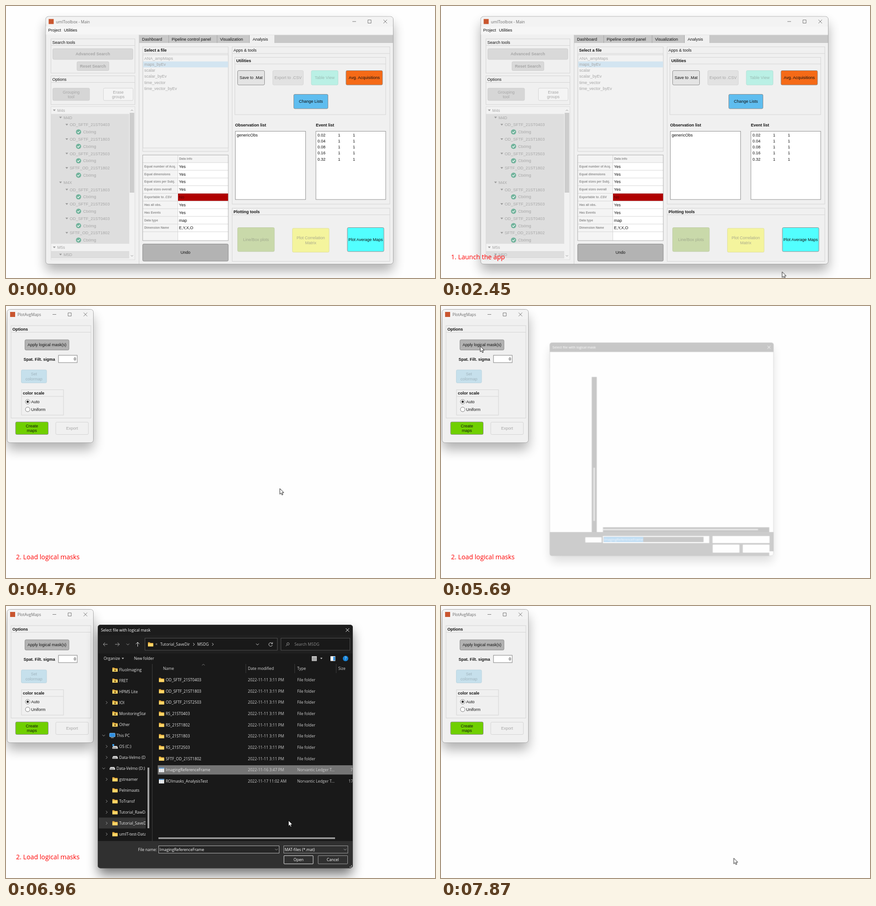
Animation of 940 by 596 pixels, one loop 8000 ms. Source, as an HTML page:

```html
<!DOCTYPE html>
<html lang="en">
<head>
<meta charset="utf-8">
<title>Average maps walkthrough</title>
<style>
html, body { margin: 0; width: 100%; height: 100%; overflow: hidden; background: #fefefe; }
svg { display: block; width: 940px; height: 596px; }
text { font: 9px "Liberation Sans", Arial, sans-serif; }
.b { font-weight: bold; }
.s { font-size: 6.7px; font-weight: bold; }
.ui { font: 8.6px "Open Sans", "Noto Sans", sans-serif; }
.cap { font: 14.2px "Open Sans", "Noto Sans", sans-serif; fill: #f00; }
.mid { text-anchor: middle; }
.end { text-anchor: end; }
.soft { filter: blur(13px); }

.t { animation: 8s step-end infinite; }
#main { animation-name: main; }
#ready { animation-name: ready; }
#busy { animation-name: busy; }
#cap1 { animation-name: cap1; }
#cap2 { animation-name: cap2; }
#tool { animation-name: tool; }
#dialog { animation-name: dialog; transform-origin: 480.5px 307.8px; }
#blank { animation-name: blank; }
#hover { animation-name: hover; }
#picked { animation-name: picked; }
#marked { animation-name: marked; }
#cursor { animation: seen 8s step-end infinite, move 8s infinite; }

@keyframes main { 0% { opacity: 1 } 59.5% { opacity: 0 } }
@keyframes ready { 0% { opacity: 1 } 44.6% { opacity: 0 } }
@keyframes busy { 0% { opacity: 0 } 44.6% { opacity: 1 } }
@keyframes cap1 { 0% { opacity: 0 } .875% { opacity: 1 } 44.6% { opacity: 0 } }
@keyframes cap2 { 0% { opacity: 0 } 59.5% { opacity: 1 } 91.375% { opacity: 0 } }
@keyframes tool { 0% { opacity: 0 } 59.5% { opacity: 1 } }
@keyframes dialog {
  0% { opacity: 0; transform: none }
  71.1% { opacity: .24; transform: translate(3px, 6px) scale(.878, .876) }
  72% { opacity: .7; transform: translate(1px, 2px) scale(.95) }
  72.9% { opacity: .95; transform: scale(.985) }
  73.8% { opacity: 1; transform: none }
  94% { opacity: .8; transform: scale(.985) }
  94.875% { opacity: .45; transform: scale(.955) }
  95.75% { opacity: .18; transform: scale(.925) }
  96.625% { opacity: .05; transform: scale(.9) }
  97.5% { opacity: 0; transform: none }
}
@keyframes blank { 0% { opacity: 1 } 72% { opacity: 0 } }
@keyframes hover {
  0% { opacity: 0; transform: none }
  74.4% { opacity: 1; transform: translateY(74px) }
  75.1% { opacity: 1; transform: translateY(123.3px) }
  75.95% { opacity: 1; transform: translateY(147.9px) }
  78% { opacity: 1; transform: translateY(172.6px) }
  80% { opacity: 1; transform: translateY(197.2px) }
  82% { opacity: 0; transform: none }
  82.7% { opacity: 1; transform: translateY(221.9px) }
  83.6% { opacity: 0; transform: none }
}
@keyframes picked { 0% { opacity: 0 } 82% { opacity: 1 } }
@keyframes marked { 0% { opacity: 1 } 82% { opacity: 0 } }
@keyframes seen { 0% { opacity: 0 } 30.6% { opacity: 1 } 44.6% { opacity: 0 } 59.5% { opacity: 1 } }
@keyframes move {
  0%, 30.6% { transform: translate(747.5px, 582.5px); animation-timing-function: steps(3) }
  33.375% { transform: translate(771px, 543px); animation-timing-function: steps(3) }
  36.125%, 39.25% { transform: translate(783px, 524px); animation-timing-function: steps(3) }
  41.875% { transform: translate(788px, 516px); animation-timing-function: step-end }
  59.5% { transform: translate(600px, 400px); animation-timing-function: steps(5) }
  63.6% { transform: translate(230px, 172px); animation-timing-function: steps(6) }
  68.5%, 71.1% { transform: translate(86px, 88px); animation-timing-function: steps(2) }
  73.1% { transform: translate(215px, 147px); animation-timing-function: steps(3) }
  75.1% { transform: translate(515.5px, 301.5px); animation-timing-function: steps(7) }
  81.125%, 82% { transform: translate(540px, 357px); animation-timing-function: steps(6) }
  86.95% { transform: translate(619px, 470px); animation-timing-function: steps(5) }
  91.375%, 100% { transform: translate(641.5px, 552.5px) }
}
</style>
</head>
<body>
<svg id="stage" viewBox="0 0 940 596" xmlns="http://www.w3.org/2000/svg"></svg>
<script>
const GREY = '#a6a6a6', EDGE = '#d4d4d4', DARK = '#8c8c8c';

const box = (x, y, x2, y2, fill, stroke = 'none', r = 0) =>
  `<rect x="${x}" y="${y}" width="${x2 - x}" height="${y2 - y}" rx="${r}" fill="${fill}" stroke="${stroke}"/>`;
const line = (d, stroke, w = 1) => `<path d="${d}" fill="none" stroke="${stroke}" stroke-width="${w}"/>`;
const shape = (d, fill) => `<path d="${d}" fill="${fill}"/>`;
const text = (x, y, s, fill = '#111', cls = '') => `<text x="${x}" y="${y}" fill="${fill}" class="${cls}">${s}</text>`;
const group = (id, ...parts) => `<g id="${id}" class="t">${parts.join('')}</g>`;
const each = (list, fn) => list.map(fn).join('');

const button = (x, y, x2, y2, label, fill, color = '#111', stroke = DARK, cls = '') => {
  const rows = label.split('|'), cx = (x + x2) / 2, cy = (y + y2) / 2 + 3.2;
  return box(x, y, x2, y2, fill, stroke, 2.5) +
    each(rows, (s, i) => text(cx, cy + (i - (rows.length - 1) / 2) * 10.3, s, color, 'mid ' + cls));
};
const panel = (x, y, x2, y2, title, cls = 'b') =>
  box(x, y, x2, y2, 'none', EDGE) + line(`M${x} ${y + 14.5}H${x2}`, EDGE) + text(x + 3, y + 10.5, title, '#111', cls);
const frame = (x, y, x2, y2, title) => {
  const cy = y + 11;
  return `<g class="soft" opacity=".3">${box(x, y + 15, x2, y2 + 15, '#000', 'none', 8)}</g>` +
    box(x, y, x2, y2, '#f0f0f0', '#a8a8a8', 6) + box(x + .5, y + .5, x2 - .5, y + 21, '#f3f3f3', 'none', 6) +
    box(x + 6.5, cy - 5.5, x + 17.5, cy + 5.5, '#c9562f') + text(x + 22.5, cy + 3.7, title, '#6a6a6a', 'ui') +
    line(`M${x2 - 89.5} ${cy}h8M${x2 - 55.5} ${cy - 3.5}h7v7h-7zM${x2 - 21.5} ${cy - 4}l8 8m0-8l-8 8`, '#555', .8);
};

// Main window
const subjects = ['OD_SFTF_21ST0403', 'OD_SFTF_21ST1803', 'OD_SFTF_21ST2503', 'SFTF_OD_21ST1802'];
const leaves = order => order.flatMap(i => [[2, subjects[i]], [3, 'CtxImg']]);
const tree = [[0, 'M4s'], [1, 'M4D'], ...leaves([0, 1, 2, 3]), [1, 'M4X'], ...leaves([1, 2, 0, 3]), [0, 'M5s'], [1, 'M5D']];

const treeRow = ([level, name], i) => {
  const y = 228.5 + i * 15.8, x = 105.8 + level * 13.7;
  if (level === 3) return `<circle cx="159" cy="${y}" r="5.7" fill="#72b39c"/>` +
    line(`M156.3 ${y}l2 2.2 3.6-4`, '#fff', 1.3) + text(169, y + 3.2, name, GREY);
  return shape(`M${x - 3} ${y - 1.8}h6l-3 3.8z`, '#9a9a9a') + text(x + 6.4, y + 3.2, name, GREY);
};

const left = panel(98.5, 72, 282.5, 147, 'Search tools', '') +
  button(102.5, 93.5, 278, 117, 'Advanced Search', '#d9d9d9', GREY, '#cecece', 'b') +
  button(155.5, 122, 225.5, 141.5, 'Reset Search', '#d9d9d9', GREY, '#cecece', 'b') +
  panel(98.5, 153, 282.5, 216, 'Options', '') +
  button(102.5, 180, 183, 207, 'Grouping|tool', '#d6d6d6', GREY, '#cecece') +
  button(213.5, 180, 278.5, 207, 'Erase|groups', '#f4f4f4', GREY, EDGE) +
  box(98.5, 220.5, 282.5, 556, '#f2f2f2', '#dcdcdc') +
  box(99, 236.5, 270, 521, '#dedede') + box(99, 537, 270, 553, '#dedede') +
  box(271, 234, 281, 409, '#cdcdcd') + line('M273.5 230l2.5-2.5 2.5 2.5M273.5 546l2.5 2.5 2.5-2.5', '#999') +
  each(tree, treeRow) + line('M291.5 63V565', '#cfcfcf');

const tabs = box(292, 63.5, 848, 81, '#c8c8c8') + box(534, 63.5, 588, 82, '#f0f0f0') +
  line('M356.5 64V81M462.5 64V81M533.5 64V81', '#a6a6a6') +
  text(298, 75.5, 'Dashboard') + text(363, 75.5, 'Pipeline control panel') +
  text(469, 75.5, 'Visualization') + text(540.5, 75.5, 'Analysis');

const files = ['ANA_ampMaps', 'maps_byEv', 'scalar', 'scalar_byEv', 'time_vector', 'time_vector_byEv'];
const info = [['Equal number of Acq.', 'Yes'], ['Equal dimensions', 'Yes'], ['Equal sizes per Subj.', 'Yes'],
  ['Equal sizes overall', 'Yes'], ['Exportable to .CSV', 'No'], ['Has all obs.', 'Yes'], ['Has Events', 'Yes'],
  ['Data type', 'map'], ['Dimension Name', 'E,Y,X,O']];

const middle = panel(299.5, 89.5, 487, 318.5, 'Select a file') +
  box(300, 107, 487, 311, '#f2f2f2', EDGE) + box(300.5, 121.5, 486.5, 134.5, '#d3e5f1') +
  each(files, (s, i) => text(303, 117.6 + i * 13.25, s, GREY)) +
  box(299.5, 326.5, 487, 514, '#f4f4f4') + box(377, 343, 487, 514, '#fff') +
  box(377, 410.8, 487, 427.2, '#b00000') +
  each(info, ([k, v], i) => {
    const y = 351.6 + i * 16.83;
    return line(`M300 ${y - 8.4}H487`, '#d6d6d6') + text(303, y + 2.2, k, '#8e8e8e', 's') +
      text(379, y + 3.2, v, v === 'No' ? '#5c0000' : '#111');
  }) +
  line('M300 494.7H487M376.5 327V514', '#d6d6d6') + text(379.5, 337.3, 'Data info', '#8e8e8e', 's') +
  box(299.5, 326.5, 487, 514, 'none', '#adadad') +
  button(299.5, 521.5, 487, 559, 'Undo', '#b3b3b3');

const right = panel(495.5, 89.5, 841, 434, 'Apps &amp; tools', '') +
  panel(501.5, 112.5, 832, 238, 'Utilities') +
  button(507.5, 141.5, 566.5, 173, 'Save to .Mat', '#e4e4e4') +
  button(584.5, 141.5, 651.5, 173, 'Export to .CSV', '#e2e2e2', GREY, '#d6d6d6') +
  button(669, 141.5, 727.5, 173, 'Table View', '#baf0e5', '#98bab2', '#b4e0d6') +
  button(745, 141.5, 825, 173, 'Avg. Acquisitions', '#f56a17') +
  button(630.5, 193.5, 705.5, 225, 'Change Lists', '#5fbdef') +
  text(502, 264.2, 'Observation list', '#111', 'b') + text(679, 264.2, 'Event list', '#111', 'b') +
  box(502.5, 274.5, 656.5, 424, '#fff', '#8f8f8f') + box(679, 274.5, 832, 424, '#fff', '#8f8f8f') +
  text(505.5, 285.5, 'genericObs') +
  each(['0.02', '0.04', '0.08', '0.16', '0.32'], (s, i) => {
    const y = 285.5 + i * 13.25;
    return text(682.5, y, s) + text(727.5, y, 1) + text(760, y, 1);
  }) +
  panel(495.5, 443, 841, 559.5, 'Plotting tools') +
  button(507.5, 485.5, 588, 538, 'Line/Box plots', '#c9d9aa', '#a0a98e', '#c0cda8') +
  button(627.5, 487, 708, 539.5, 'Plot Correlation|Matrix', '#f4f49d', '#a9a98c', '#e0e0a4') +
  group('ready', button(748, 485.5, 828, 538, 'Plot Average Maps', '#52ffff')) +
  group('busy', button(748, 485.5, 828, 538, 'Plot Average Maps', '#b9f6f4', '#8fb0b0', '#abdedd'));

const main = group('main', frame(87, 23, 848.5, 565.5, 'umIToolbox - Main'),
  box(87.5, 44.5, 848, 62.5, '#f6f6f6'),
  '<g style="font-size:8.3px">', text(92.5, 56, 'Project'), text(127, 56, 'Utilities'), '</g>',
  left, tabs, middle, right);

// Small options window
const radio = (y, s) => `<circle cx="47.5" cy="${y}" r="5" fill="#fff" stroke="#777"/>` + text(55, y + 3.3, s);
const tool = group('tool', frame(2.5, 7.5, 191.5, 299.5, 'PlotAvgMaps'),
  panel(11, 43, 186, 245.5, 'Options'),
  button(41.5, 74, 138, 96.5, 'Apply logical mask(s)', '#b2b2b2'),
  text(38.5, 119.6, 'Spat. Filt. sigma', '#111', 'b'),
  box(115, 108, 156, 124, '#fff', '#808080'), text(153.5, 119.2, '0', '#111', 'end'),
  button(33.5, 140, 89, 168.5, 'Set|colormap', '#c6e0ec', '#9fb3bd', '#bdd5e0'),
  panel(34, 183.5, 126, 239, 'color scale'),
  radio(209.8, 'Auto'), '<circle cx="47.5" cy="209.8" r="2.5" fill="#222"/>', radio(226.6, 'Uniform'),
  button(21, 254, 92.5, 281.5, 'Create|maps', '#70cf00'),
  button(109, 254.5, 180.5, 281.5, 'Export', '#f0f0f0', GREY, EDGE));

// File dialog
const ui = (x, y, s, fill = '#e8e8e8', cls = '') => text(x, y + 3, s, fill, 'ui ' + cls);
const folder = (x, y) => shape(`M${x} ${y - 4.5}h4l1.5 1.5h6v7.5h-11.5z`, '#e3a93a') +
  shape(`M${x} ${y - 1.5}h11.5v6h-11.5z`, '#ffd667');
const chevron = (x, y, down, c = '#9a9a9a') =>
  line(down ? `M${x - 3} ${y - 1.5}l3 3 3-3` : `M${x - 1.5} ${y - 3}l3 3-3 3`, c);
const sheet = y => box(335, y - 5, 346.5, y + 5, '#f2f2f2') + box(335, y - 5, 346.5, y - 3, '#4a8fd0') +
  line(`M339 ${y - 3}v8m4-8v8`, '#a9bccd', .7);
const drive = (x, y) => shape(`M${x + 2} ${y - 3}h8l2 3v3h-12v-3z`, '#d5d5d5') + line(`M${x + 1} ${y + 1}h8`, '#555');

// [label, icon, arrow]
const places = [['FluoImaging', 'pin'], ['FRET', 'pin'], ['HPMS Lite', 'pin'], ['IOI', 'pin', 1], ['MonitoringStation', 'pin'],
  ['Other', 'pin'], ['This PC', 'pc', 2], ['OS (C:)', 'os', 1], ['Data-Velmo (D:)', 'drive', 1], ['Data-Velmo (D:)', 'drive', 2],
  ['gstreamer', '', 1], ['Pelnimaats', ''], ['ToTransf', '', 1], ['Tutorial_RawData', '', 1],
  ['Tutorial_SaveDir', '', 1], ['umIT-test-Data', '', 1]];
const place = ([name, icon, arrow], i) => {
  const y = 139.5 + i * 24.03, x = arrow === 2 ? 227 : 233;
  const art = icon === 'pc' ? box(x, y - 5, x + 12, y + 3, '#2f8fe0', '#79bdf2', 1) + line(`M${x + 3} ${y + 5}h6`, '#ccc')
    : icon === 'drive' ? drive(x, y)
    : icon === 'os' ? drive(x, y + 2) + box(x, y - 5, x + 4, y - 1, '#3aa0f0')
    : folder(x, y) + (icon ? box(x + 4, y - .5, x + 8, y + 3, '#8a6418') : '');
  return art + ui(x + 15, y, name) + (arrow ? chevron(arrow === 2 ? 214 : 220.5, y, arrow === 2) : '');
};

const entries = ['OD_SFTF_21ST0403', 'OD_SFTF_21ST1803', 'OD_SFTF_21ST2503', 'RS_21ST0403', 'RS_21ST1802', 'RS_21ST1803',
  'RS_21ST2503', 'SFTF_OD_21ST1802', 'ImagingReferenceFrame', 'ROImasks_AnalysisTest'];
const entry = (name, i) => {
  const y = 162 + i * 24.65, c = '#d0d0d0', file = i > 7;
  return (file ? sheet(y) : folder(335, y)) + ui(350, y, name) +
    ui(530, y, ['2022-11-16 3:47 PM', '2022-11-17 11:02 AM'][i - 8] || '2022-11-11 3:11 PM', c) +
    ui(638, y, file ? 'Norvantic Ledger T...' : 'File folder', c) +
    (file ? ui(i === 8 ? 755 : 750.5, y, i === 8 ? 7 : 17, c) : '');
};

const fileName = 'ImagingReferenceFrame';
const marked = box(336, 527, 434.5, 540, '#0078d4') + ui(336.5, 533.5, fileName, '#d8ecff');
const bars = box(310, 354, 314, 487, '#9f9f9f') + box(334, 507, 721, 510.5, '#9f9f9f');

const header = box(201, 41.5, 760, 64.5, '#1c1c1c') + ui(208, 53, 'Select file with logical mask', '#fff') +
  line('M744.5 49l7.5 7.5m0-7.5l-7.5 7.5', '#fff');

const address = box(201, 64, 760, 104, '#1f1f1f') +
  line('M222.5 84h-9.5m4-4l-4 4 4 4', '#a8a8a8') + line('M239 84h9.5m-4-4l4 4-4 4', '#a8a8a8') +
  chevron(267, 84, true) + line('M288.5 89v-9.5m-4 4l4-4 4 4', '#e8e8e8') +
  box(304.5, 70.5, 594.5, 97, '#191919', '#505050') + box(602.5, 70.5, 753.5, 97, '#191919', '#505050') +
  folder(311, 84) + ui(327.5, 83, '«', '#bbb') + ui(338, 84, 'Tutorial_SaveDir') + chevron(411.5, 84, false, '#ddd') +
  ui(419, 84, 'M5DG') + chevron(453, 84, false, '#ddd') + chevron(551, 84, true, '#ddd') +
  line('M583.5 82.5a4 4 0 1 0 .2 3M584 79.5v3.3h-3.3', '#ddd') +
  '<circle cx="618" cy="83" r="2.6" fill="none" stroke="#999"/>' + line('M616 85l-3 3', '#999') +
  ui(632, 84, 'Search M5DG', '#8c8c8c');

const toolbar = ui(214, 115, 'Organize') + shape('M253.5 113.5h5l-2.5 3z', '#ccc') + ui(280.5, 115, 'New folder') +
  box(670, 110, 681, 120.5, '#d0d0d0') + line('M671 113h9m-9 2.5h9m-9 2.5h9', '#555', .8) +
  shape('M688.5 113.5h5l-2.5 3z', '#ccc') +
  box(711, 110, 721.5, 120.5, '#fff') + box(717, 111, 721, 119.5, '#2f8fe0') +
  '<circle cx="744" cy="115" r="6" fill="#1683d8"/>' + ui(744, 115.2, '?', '#fff', 'mid') +
  line('M525.5 127v20M632.5 127v20M723.5 127v20M320.5 127V515', '#3c3c3c') + line('M429.5 130l3-2.5 3 2.5', '#999', .8) +
  each([[344, 'Name'], [530, 'Date modified'], [638, 'Type'], [728, 'Size']], ([x, s]) => ui(x, 137, s, '#d8d8d8'));

const footer = box(201, 515, 760, 575, '#303030') + ui(330.5, 533.5, 'File name:', '#eee', 'end') +
  box(334.5, 525.5, 598.5, 541.5, '#262626', '#b5b5b5') + ui(336.5, 533.5, fileName, '#fff') + chevron(592.5, 533.5, true) +
  group('marked', marked) +
  box(608.5, 525.5, 749, 541.5, '#303030', '#a0a0a0') + ui(610.5, 533.5, 'MAT-files (*.mat)', '#fff') + chevron(743, 533.5, true) +
  box(609, 547, 673, 565, '#303030', '#f0f0f0', 1) + ui(641, 556, 'Open', '#fff', 'mid') +
  box(684, 547, 748.5, 565, '#303030', '#a0a0a0', 1) + ui(716, 556, 'Cancel', '#fff', 'mid') +
  line('M757 568v2M757 571v2M754 571v2', '#aaa', 2);

// Unpainted first look of the dialog
const blank = group('blank', box(201, 64.5, 760, 515, '#fff'), box(306, 127, 318.5, 515, '#1c1c1c'),
  box(334, 503, 749, 515, '#1c1c1c'), bars,
  box(290, 528, 330.5, 541, '#fff'), box(334, 525, 599, 542.5, '#fff'), box(335.5, 527, 585, 540, '#222'), marked,
  box(607.5, 525, 749.5, 542.5, '#fff'), box(608, 546.5, 674.5, 566.5, '#fff'),
  box(683, 546.5, 749.5, 566.5, '#fff'), box(749, 563, 760, 575, '#fff'));

const dialog = group('dialog',
  `<g class="soft" opacity=".55">${box(203, 56, 758, 588, '#000')}</g>`,
  '<g clip-path="url(#edge)">', box(201, 41, 760, 575, '#191919'), header, address, toolbar,
  box(203.5, 463.5, 306, 487.5, '#363636'), `<g clip-path="url(#side)">${each(places, place)}</g>`, bars,
  group('hover', box(332.5, 151.7, 760, 172.3, '#4b4b4b')),
  group('picked', box(332.5, 349, 760, 369.3, '#757575')),
  each(entries, entry), footer, blank, '</g>',
  box(201.5, 41.5, 759.5, 574, 'none', 'rgba(70,70,70,.6)', 6));

const cursor = '<path id="cursor" d="M0 0V12.4L2.8 9.8 4.7 14.1 6.8 13.2 4.9 9H8.8Z" fill="#fff" stroke="#000" stroke-width=".9"/>';

document.getElementById('stage').innerHTML =
  `<defs><clipPath id="edge">${box(201, 41, 760, 574.5, '#000', 'none', 6)}</clipPath>` +
  `<clipPath id="side">${box(201, 127, 306, 515, '#000')}</clipPath></defs>` +
  main + tool + dialog +
  group('cap1', text(22, 555, '1. Launch the app', '#f00', 'cap')) +
  group('cap2', text(22, 555, '2. Load logical masks', '#f00', 'cap')) + cursor;
</script>
</body>
</html>
```
